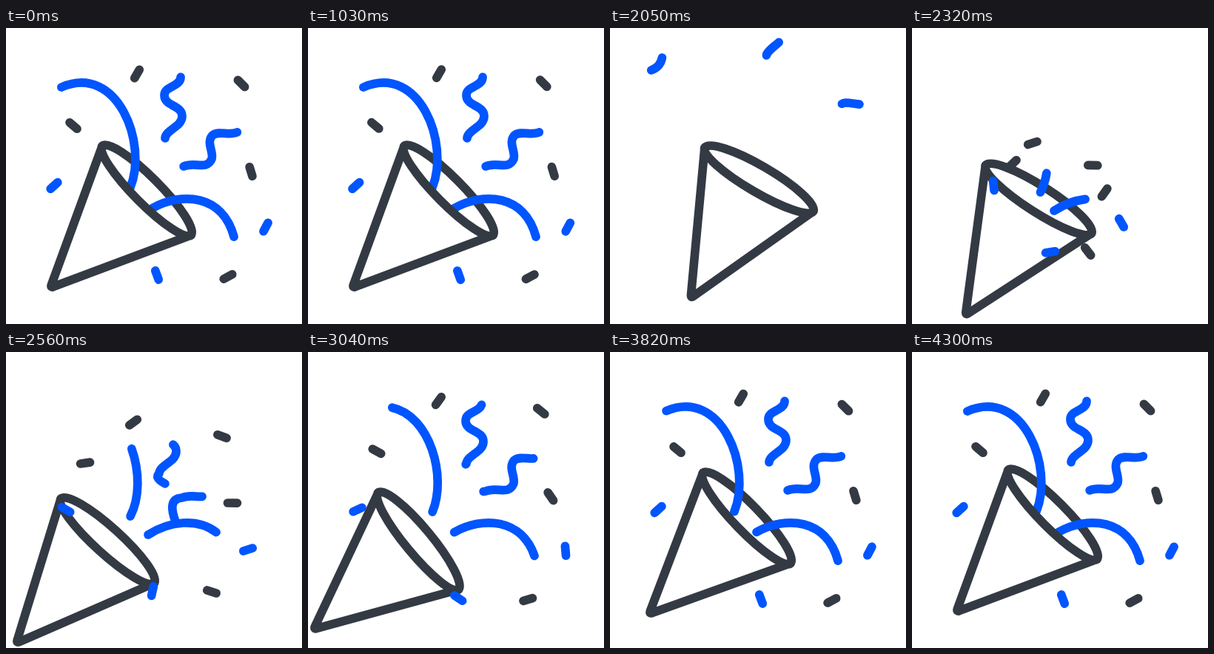
Write an HTML page that moves like this. It is 400x400 px and loops after 4330 ms.

```html
<!DOCTYPE html>
<html lang="en">
<head>
<meta charset="utf-8">
<title>Party popper</title>
<style>
html, body { margin: 0; width: 100%; height: 100%; overflow: hidden; background: #fff; }
svg { display: block; width: 100%; height: 100%; }
path { fill: none; stroke-linecap: round; stroke-linejoin: round; stroke-width: 11.7; }
.dark { stroke: #343a43; }
.blue { stroke: #0055ff; }
</style>
</head>
<body>
<svg viewBox="0 0 400 400">
  <g class="cone"><path class="dark" d="M66-187.5A84 18 45.2 0 1 186-67"/></g>
  <g id="ribbons"></g>
  <g class="cone"><path class="dark" d="M66-187.5L-2.8 .5Q-3.8 3.8-.5 2.8L186-67A84 17 45.2 0 1 66-187.5"/></g>
  <g id="bits"></g>
</svg>
<script>
const LOOP = 4330, LEAVE = 1030, BURST = 2190, SETTLE = 4240;
const clamp = v => Math.max(0, Math.min(1, v));
const decay = (t, start, power) => clamp((SETTLE - t) / (SETTLE - start)) ** power;
const halving = (t, start, half) => 2 ** (-(t - start) / half);

function addPath(parent, cls, d) {
  const path = document.createElementNS('http://www.w3.org/2000/svg', 'path');
  path.setAttribute('class', cls);
  path.setAttribute('d', d);
  return document.getElementById(parent).appendChild(path);
}

// Cone tip: time, x, y, rotation in degrees
const coneKeys = [
  [1030, 64, 347, 0], [2050, 112, 360, -14.8], [2170, 114, 361, -15.3],
  [2400, 50, 391, -10], [2560, 18, 389, -3], [2700, 7, 386, 1.5],
  [2850, 4.5, 379, 4.4], [3040, 12, 371, 5.2], [3300, 24, 365, 4.2],
  [3820, 57, 350, 0.8], [4300, 64, 347, 0]
];

const slope = (i, c) => (coneKeys[i + 1][c] - coneKeys[i][c]) / (coneKeys[i + 1][0] - coneKeys[i][0]);

function tangent(i, c) {
  if (i === 0 || i === coneKeys.length - 1) return 0;
  const a = slope(i - 1, c), b = slope(i, c);
  return a * b <= 0 ? 0 : 2 * a * b / (a + b);
}

// Monotone cubic interpolation of one cone channel
function coneAt(t, c) {
  const last = coneKeys.length - 1;
  if (t <= coneKeys[0][0]) return coneKeys[0][c];
  if (t >= coneKeys[last][0]) return coneKeys[last][c];
  const i = coneKeys.findIndex(k => k[0] > t) - 1;
  const a = coneKeys[i], b = coneKeys[i + 1], span = b[0] - a[0], u = (t - a[0]) / span;
  return a[c] + (b[c] - a[c]) * u * u * (3 - 2 * u)
    + span * u * (1 - u) * (tangent(i, c) * (1 - u) - tangent(i + 1, c) * u);
}

// Each ribbon slides along its path; body is the part shown at rest
const ribbons = [
  { lead: 7, body: 'M165 222C195 165 154 46 75 80', tail: 'C30 92 20 62 52 58C66 55 71 45 71 34',
    start: 2240, power: 3.3, gone: 2086, shift: [3, 0] },
  { lead: 7, body: 'M192 247C232 221 292 222 308 282', tail: 'C313 300 316 318 322 335',
    start: 2190, power: 5.7, gone: 1900, shift: [0, 0] },
  { entry: 'M223 163C212 157 211 153 215 149',
    body: 'C216 137 238 134 238 119C238 104 214 106 214 91C214 78 235 80 236 67',
    tail: 'C238 52 206 50 212 35C216 28 224 24 234 14',
    start: 2419, power: 9, gone: 2120, shift: [-8, 15] },
  { entry: 'M231 219C226 205 222 188 240 187',
    body: 'C255 180 271 193 278 177C281 167 270 155 279 145C288 138 301 146 312 141',
    tail: 'C330 132 300 102 318 101C326 101 332 103 345 104',
    start: 2410, power: 7, gone: 2120, shift: [-2, 10] }
];

for (const r of ribbons) {
  r.el = addPath('ribbons', 'blue', '');
  const measure = d => { r.el.setAttribute('d', d); return r.el.getTotalLength(); };
  const entry = r.entry || '';
  r.from = r.lead || measure(entry);
  r.to = measure(entry + r.body);
  r.end = measure(entry + r.body + r.tail);
}

function drawRibbon(r, t) {
  let from, to, near = 0;
  if (t < BURST) {
    const u = clamp((t - LEAVE) / (r.gone - LEAVE));
    from = r.from + (r.end - r.from) * u ** 3;
    to = r.to + (r.end - r.to) * u ** 1.9;
  } else {
    from = r.from * clamp(1 - halving(t, 2560, 120));
    to = r.to * (1 - decay(t, r.start, r.power));
    near = 5 * halving(t, BURST, 160);
  }
  r.el.style.display = to - from > 0.5 ? '' : 'none';
  r.el.setAttribute('stroke-dasharray', `${Math.max(0, to - from)} 9999`);
  r.el.setAttribute('stroke-dashoffset', -from);
  r.el.setAttribute('transform', `translate(${r.shift[0] * near} ${r.shift[1] * near})`);
}

// Colour, resting x, y and angle, then offset in x, y and angle during the burst
const bits = [
  ['dark', 177, 62, -60, -5, 33, 24], ['dark', 91, 132, 40, 16, 18, -48],
  ['dark', 318, 75, 45, -26, 39, -25], ['dark', 331, 194, 73, -25, 10, -73],
  ['dark', 300, 336, -28, -22, -12, 46], ['blue', 65, 213, -42, 16, 0, 72],
  ['blue', 351, 269, -62, -24, -2, -136], ['blue', 204, 334, 70, -6, -11, -148]
].map(([cls, ...pose]) => ({ el: addPath('bits', cls, 'M-6.5 0H6.5'), pose }));

function drawBit({ el, pose: [x, y, angle, dx, dy, turn] }, t) {
  if (t < BURST) {
    const out = 0.6 * (Math.max(0, t - 1000) / 560) ** 2;
    x += (x - 190) * out;
    y += (y - 225) * out;
    angle -= turn * out;
  } else {
    const near = 5 * halving(t, BURST, 160);
    x += dx * near;
    y += dy * near;
    angle += turn * decay(t, BURST, 4.2) / 0.433;
  }
  el.style.display = t > 1700 && t < BURST ? 'none' : '';
  el.setAttribute('transform', `translate(${x} ${y}) rotate(${angle})`);
}

const cones = document.querySelectorAll('.cone');
const begin = performance.now();

function draw() {
  const time = (performance.now() - begin) % LOOP;
  const t = time < LEAVE ? 0 : time;
  const pose = `translate(${coneAt(t, 1)} ${coneAt(t, 2)}) rotate(${coneAt(t, 3)})`;
  cones.forEach(c => c.setAttribute('transform', pose));
  ribbons.forEach(r => drawRibbon(r, t));
  bits.forEach(b => drawBit(b, t));
  requestAnimationFrame(draw);
}
draw();
</script>
</body>
</html>
```
